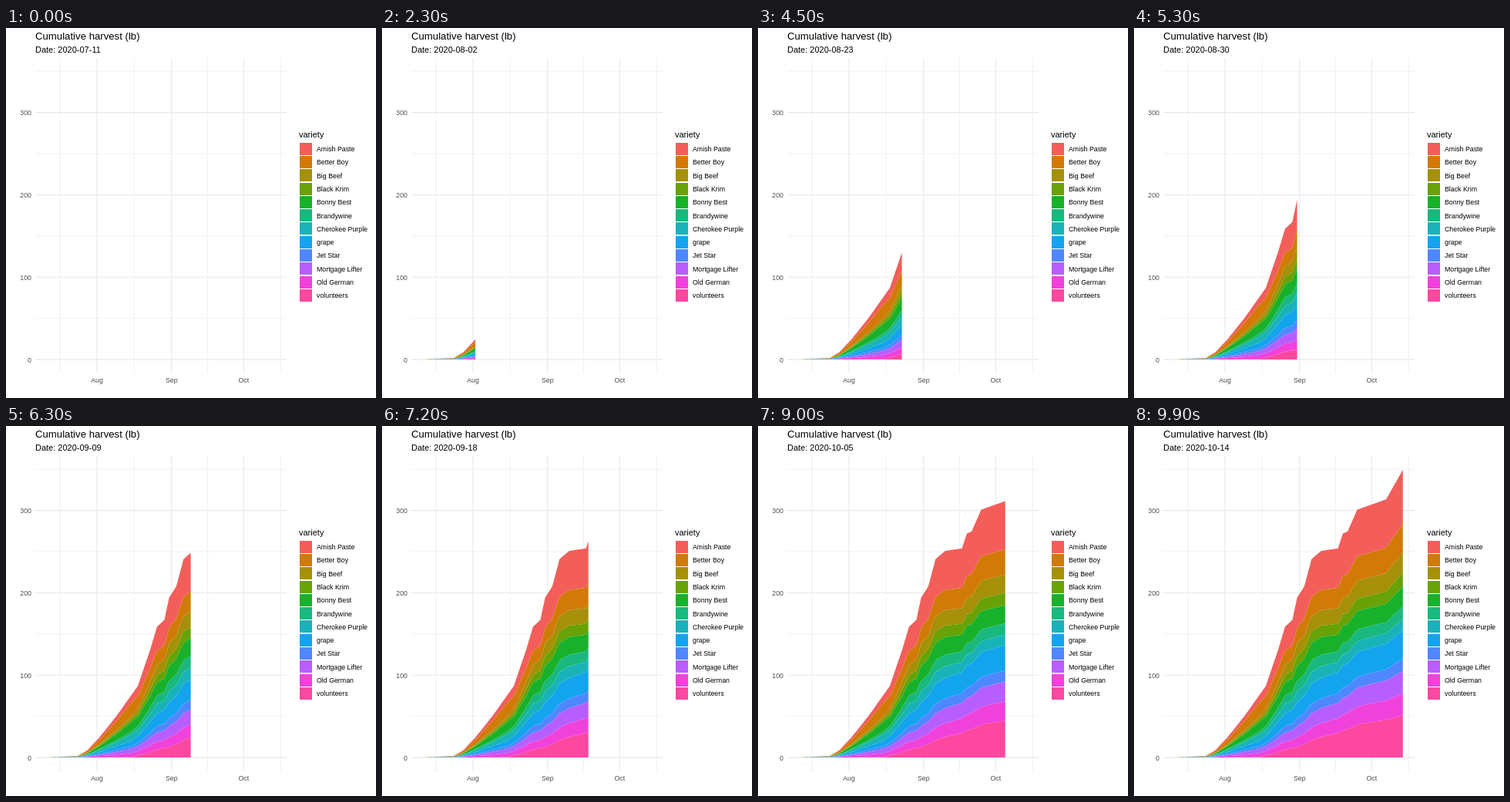
An HTML page that plays this animation: 480x480 px, repeating every 10 s.

```html
<!DOCTYPE html>
<html lang="en">
<head>
<meta charset="utf-8">
<title>Cumulative harvest</title>
<style>
  html, body { margin: 0; width: 100%; height: 100%; overflow: hidden; background: #fff; }
  svg { display: block; width: 480px; height: 480px; font-family: "Liberation Sans", Arial, sans-serif; }
</style>
</head>
<body>
<svg id="chart" viewBox="0 0 480 480"></svg>
<script>
const LOOP = 10000, STEPS = 100, LAST_DAY = 95;
const START = Date.UTC(2020, 6, 11), DAY_MS = 864e5;
const EARLY = 35, MID = 51;

// name, colour, share of the harvest in percent: early, mid and late season
const varieties = [
  ["Amish Paste", "#f35e5a", 12, 19, 18.8],
  ["Better Boy", "#d17a07", 22, 9.6, 9.9],
  ["Big Beef", "#a59008", 5, 8, 7],
  ["Black Krim", "#68a206", 4, 6, 4.8],
  ["Bonny Best", "#17b12b", 15.5, 9.5, 7],
  ["Brandywine", "#19b87e", 4.5, 6.5, 4.3],
  ["Cherokee Purple", "#18b3b8", 9.7, 6.7, 4],
  ["grape", "#13a4ee", 9, 10, 9.9],
  ["Jet Star", "#4f87ff", 4.5, 5, 4.3],
  ["Mortgage Lifter", "#b85eff", 6.5, 7, 7.8],
  ["Old German", "#f042db", 6.5, 6, 7.5],
  ["volunteers", "#fc489f", .6, 6.7, 14.7]
];

// [day, total in lb] at the bends of the curve
const totals = [
  [0, 0], [13, 2], [17, 9], [22, 24.5], [29, 50], [38, 87], [43, 130], [46, 159],
  [49, 167], [51, 194], [54, 208], [57, 241], [61, 251], [68, 254], [70, 272],
  [72, 274.5], [76, 301], [88, 313.5], [95, 349.5]
];

const xAt = day => 52.6 + day * 3.118;
const yAt = lb => 430.1 - lb * 1.0683;
const lerp = (a, b, k) => a + (b - a) * k;
const clamp = k => Math.min(1, Math.max(0, k));
const easeOut = k => 1 - (1 - clamp(k)) ** 2;

function totalOn(day) {
  const i = Math.max(1, totals.findIndex(([d]) => d >= day));
  const [d0, a] = totals[i - 1], [d1, b] = totals[i];
  return lerp(a, b, (day - d0) / (d1 - d0));
}

// Boundary heights from the top edge down to the baseline.
function edges(day) {
  const rise = easeOut((day - EARLY) / (MID - EARLY));
  const settle = easeOut((day - MID) / (LAST_DAY - MID));
  const parts = varieties.map(([, , early, mid, late]) =>
    lerp(lerp(early, mid, rise), late, settle));
  const whole = parts.reduce((sum, part) => sum + part, 0);
  const total = totalOn(day);
  let left = whole;
  return [total, ...parts.map(part => total * (left -= part) / whole)];
}

const chart = document.getElementById("chart");
function add(tag, attrs, text) {
  const el = document.createElementNS("http://www.w3.org/2000/svg", tag);
  for (const key in attrs) el.setAttribute(key, attrs[key]);
  if (text) el.textContent = text;
  return chart.appendChild(el);
}
const label = (x, y, size, text, fill = "#000", anchor = "start") =>
  add("text", { x, y, "font-size": size, fill, "text-anchor": anchor }, text);
const grid = (d, width) => add("path", { d, stroke: "#e8e8e8", "stroke-width": width });
const vLine = (day, width) => grid(`M${xAt(day)} 39V448`, width);
const hLine = (lb, width) => grid(`M38 ${yAt(lb)}H364`, width);

[5.5, 36.5, 67, 97.5].forEach(day => vLine(day, .6));
[50, 150, 250, 350].forEach(lb => hLine(lb, .6));
[[21, "Aug"], [52, "Sep"], [82, "Oct"]].forEach(([day, month]) => {
  vLine(day, 1.1);
  label(xAt(day), 460, 8.8, month, "#4d4d4d", "middle");
});
[0, 100, 200, 300].forEach(lb => {
  hLine(lb, 1.1);
  label(33, Math.round(yAt(lb) + 3.6), 8.8, String(lb), "#4d4d4d", "end");
});

const areas = varieties.map(([, fill]) => add("path", { fill }));

label(38, 15, 13.2, "Cumulative harvest (lb)");
const dateLabel = label(38, 32, 11, "Date:");
label(380, 142, 11, "variety");
varieties.forEach(([name, fill], i) => {
  const y = 148.7 + i * 17.28;
  add("rect", { x: 381, y: Math.round(y), width: 16, height: 16, fill });
  label(403, Math.round(y + 11.5), 8.8, name);
});

const days = Array.from({ length: LAST_DAY + 1 }, (_, day) => ({ x: xAt(day), edge: edges(day) }));
let shown = -1;

function draw(step) {
  const day = step * LAST_DAY / (STEPS - 1);
  const date = new Date(START + Math.floor(day) * DAY_MS);
  dateLabel.textContent = "Date: " + date.toISOString().slice(0, 10);

  // The areas snap to the nearest day, the date to the day begun.
  const past = days.slice(0, Math.round(day) + 1);
  areas.forEach((area, i) => {
    const side = n => past.map(p => `${p.x.toFixed(2)} ${yAt(p.edge[n]).toFixed(2)}`);
    area.setAttribute("d", "M" + [...side(i), ...side(i + 1).reverse()].join("L") + "Z");
  });
}

function tick() {
  const step = Math.floor(performance.now() % LOOP / (LOOP / STEPS));
  if (step !== shown) draw(shown = step);
  requestAnimationFrame(tick);
}
tick();
</script>
</body>
</html>
```
